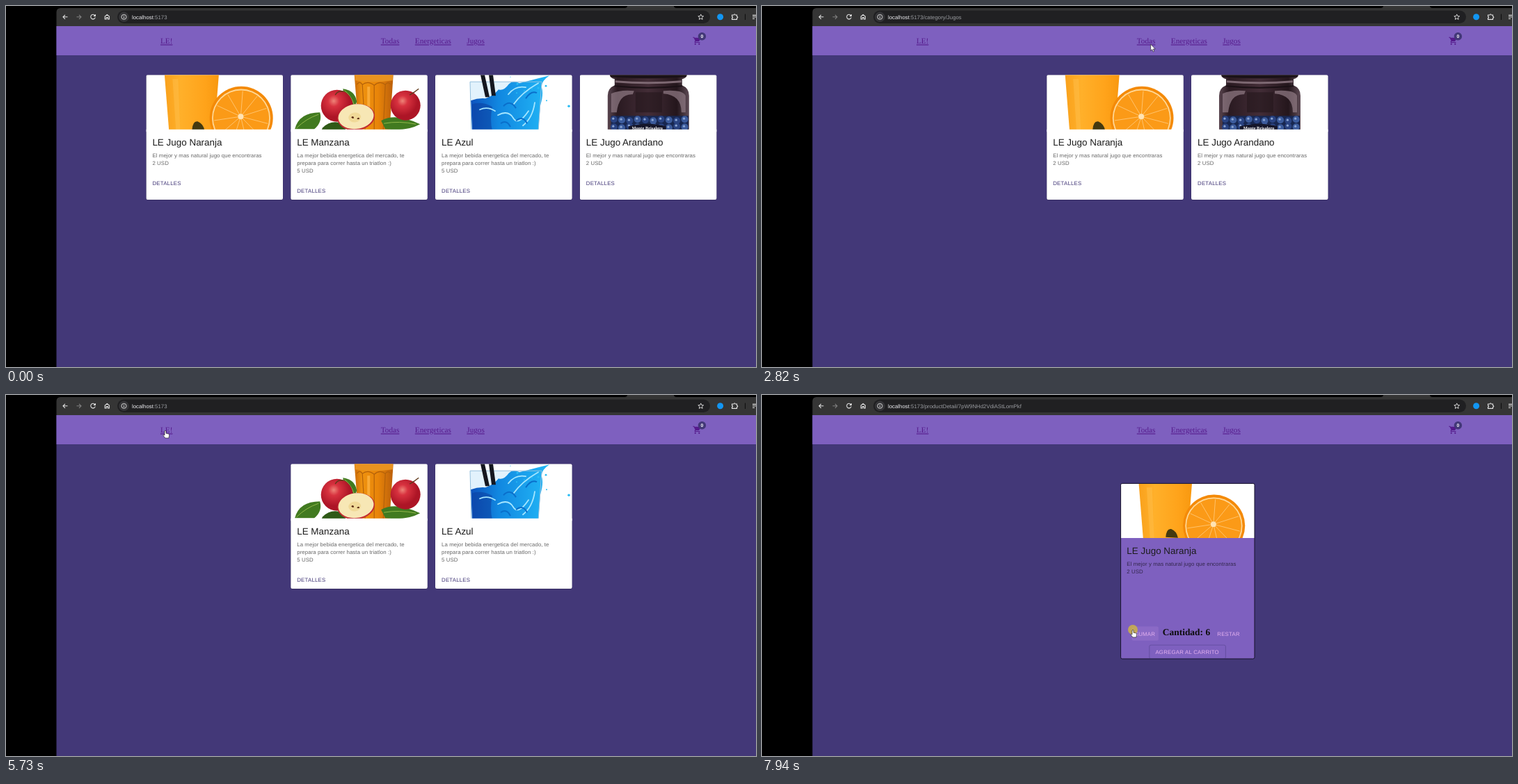
These frames come from a looping animation (1078 px wide and 520 px high, 8 s). An HTML page:

```html
<!DOCTYPE html>
<html lang="es">
<head>
<meta charset="utf-8">
<title>Tienda de jugos</title>
<style>
html, body { margin: 0; width: 100%; height: 100%; overflow: hidden; background: #000; }
svg { display: block; width: 1078px; height: 520px; }
text { font-family: "Liberation Sans", Arial, sans-serif; font-size: 7.84px; text-rendering: geometricPrecision; white-space: pre; }
.link { font-family: "Liberation Serif", "Times New Roman", serif; font-size: 11.2px; fill: #551a8b; text-decoration: underline; }
.title { font-size: 13.44px; fill: #1c1c1c; }
.body { fill: #000; fill-opacity: .6; letter-spacing: .01071em; }
.btn { fill: #433878; letter-spacing: .02857em; }
.pink { fill: #e4b1f0; }
.count { font-family: "Liberation Serif", "Times New Roman", serif; font-size: 13.44px; font-weight: bold; fill: #0c0c0c; }
.icon { fill: none; stroke: #e3e3e3; stroke-width: 1.1; }
.off { display: none; }
</style>
</head>
<body>
<svg viewBox="0 0 1078 520">
  <defs>
    <clipPath id="cardClip"><rect width="196.6" height="179.8" rx="2.2"/></clipPath>
    <clipPath id="itemClip"><rect x="515.6" y="127.4" width="192.4" height="252.6" rx="2.2"/></clipPath>
    <linearGradient id="juice"><stop stop-color="#f9a11c"/><stop offset=".3" stop-color="#ffb02a"/><stop offset=".75" stop-color="#ffa31a"/><stop offset="1" stop-color="#f8980f"/></linearGradient>
    <linearGradient id="cider"><stop stop-color="#c9690a"/><stop offset=".2" stop-color="#ee920f"/><stop offset=".6" stop-color="#e98509"/><stop offset="1" stop-color="#bb5f0b"/></linearGradient>
    <radialGradient id="apple" cx=".4" cy=".35"><stop stop-color="#ee8478"/><stop offset=".35" stop-color="#d8323f"/><stop offset="1" stop-color="#ad1526"/></radialGradient>
    <linearGradient id="blue"><stop stop-color="#0d52bd"/><stop offset=".35" stop-color="#1187e0"/><stop offset="1" stop-color="#22b8f7"/></linearGradient>
    <linearGradient id="jar"><stop stop-color="#5a4650"/><stop offset=".12" stop-color="#2a1a21"/><stop offset=".5" stop-color="#432d37"/><stop offset=".85" stop-color="#24161c"/><stop offset="1" stop-color="#5f4c56"/></linearGradient>

    <g id="naranja">
      <rect width="197" height="82" fill="#fff"/>
      <path d="M26.5 0H104.5L98 82H33Z" fill="url(#juice)"/>
      <path d="M38 6L43 82H49L46 6Z" fill="#ffc04c" opacity=".5"/>
      <path d="M66 79Q67 66 74 67Q82 70 84 80Z" fill="#44390f"/>
      <ellipse cx="136.8" cy="62" rx="45.5" ry="45.5" fill="#f48a08"/>
      <ellipse cx="136.6" cy="62.4" rx="42" ry="42" fill="#ffd795"/>
      <ellipse cx="136.6" cy="62.4" rx="40.2" ry="40.2" fill="#fb9a17"/>
      <g id="wedges" stroke="#ffc877" stroke-width=".9"></g>
      <circle cx="136" cy="60" r="4" fill="#ffe3b4"/>
    </g>

    <g id="manzana">
      <rect width="197" height="82" fill="#fff"/>
      <path d="M91.5 0H147.5L142 82H98Z" fill="url(#cider)"/>
      <path d="M92 0H147L146.5 8Q120 12 92.5 8Z" fill="#e9931f"/>
      <g stroke="#b3610a" stroke-width="1.2" fill="none"><path d="M103 14L107 80M120 15V80M136 14L133 80M95 14Q99 8 103 14Q111 8 120 15Q128 8 136 14Q140 9 144 14"/></g>
      <path d="M112 17V70" stroke="#ffb74a" stroke-width="4" opacity=".7"/>
      <g fill="#417a20"><path d="M6 78Q12 54 42 54Q46 68 34 78Z"/><path d="M75 20Q92 22 95 38Q94 44 90 45Q78 38 75 20Z"/><path d="M130 66Q150 54 186 71Q166 82 136 78Z"/></g>
      <path d="M8 77Q22 63 40 57M77 22Q87 30 91 43M134 70Q156 66 180 71" fill="none" stroke="#91b84a" stroke-width="1"/>
      <path d="M46 76Q58 64 74 70L80 80H44Z" fill="#2f5a17"/>
      <ellipse cx="66.5" cy="44.5" rx="23" ry="23" fill="url(#apple)"/>
      <path d="M64 29Q68 22 76 24" fill="none" stroke="#60391a" stroke-width="1.4"/>
      <ellipse cx="165" cy="44" rx="21.5" ry="21.5" fill="url(#apple)"/>
      <path d="M171 29Q178 25 184 20" fill="none" stroke="#60391a" stroke-width="1.4"/>
      <g transform="rotate(-8 94 61)"><ellipse cx="94" cy="61" rx="27" ry="19" fill="#c22c32"/><ellipse cx="94" cy="60" rx="25.6" ry="17.8" fill="#f7e7b5"/><ellipse cx="92" cy="61" rx="9" ry="7" fill="#f0d998"/></g>
      <path d="M87 61q3-3 4 1q-2 2-4-1M95 63q3-3 4 0q-2 2-4 0" fill="#5a2a12"/>
    </g>

    <g id="azul">
      <rect width="197" height="82" fill="#fff"/>
      <path d="M50 10H153L148 82H52Z" fill="#e2f2fc"/>
      <path d="M51 37Q62 33 72 34Q84 30 91 21Q98 24 106 13Q112 7 121 12Q136 8 164 1Q152 9 153 18Q156 28 151 44L148 80H53Z" fill="url(#blue)"/>
      <path d="M53 42Q68 38 82 46Q78 65 82 80H54Z" fill="#0b3e9f" opacity=".55"/>
      <path d="M50 10H153L148 82M50 10L52 82" fill="none" stroke="#94bfdd" stroke-width="1"/>
      <g fill="none" stroke="#a5e6ff" stroke-width="1.8" stroke-linecap="round"><path d="M105 28Q115 15 130 18M112 43Q125 25 148 12M90 58Q105 50 112 62T134 52M126 73Q140 62 143 40M64 50Q75 45 86 52"/></g>
      <g fill="none" stroke="#0a6fcb" stroke-width="2"><path d="M98 45Q108 35 116 48M116 66Q126 58 132 70M94 70Q103 64 108 75M130 34Q138 22 146 26"/></g>
      <path d="M65 0H71L78 32H72ZM77 0H83L87 30H81Z" fill="#15171f"/>
      <g id="drops" fill="#2bbdf4"></g>
    </g>

    <g id="arandano">
      <rect width="197" height="82" fill="#fff"/>
      <path d="M43 0H154Q154 4 147 6V15Q157 19 157 30V82H40V30Q40 19 50 15V6Q43 4 43 0Z" fill="url(#jar)"/>
      <path d="M43 0H154L152 3Q98 7 45 3Z" fill="#1a1217"/>
      <path d="M51 8Q98 12 146 8V11Q98 15 51 11Z" fill="#7d6872"/>
      <path d="M50 16Q98 21 147 16" fill="none" stroke="#1b1116" stroke-width="2"/>
      <g fill="#8c7781" opacity=".75"><path d="M45 27Q58 21 78 23L76 28Q56 27 53 54H45Z"/><path d="M120 23Q148 21 152 30V54H146Q146 29 120 27Z"/></g>
      <path d="M80 25H118V54H80Z" fill="#24161c" opacity=".6"/>
      <rect x="45" y="59" width="111" height="23" fill="#182750"/>
      <g id="berries"></g>
      <path d="M70 82V74Q98 67 124 74V82Z" fill="#15162a"/>
      <text x="97" y="79" text-anchor="middle" fill="#fff" style="font:bold 6.4px 'Liberation Serif',serif">Monte Brisalero</text>
    </g>
  </defs>

  <rect width="1078" height="520" fill="#000"/>
  <path d="M889 3Q893 3 893 0H960Q960 3 964 3Z" fill="#353535"/>
  <path d="M72.5 29V9Q72.5 3 78.5 3H1078V29Z" fill="#353535"/>
  <rect x="160" y="6.5" width="852" height="18.5" rx="9.2" fill="#202022"/>
  <circle cx="169.5" cy="15.8" r="7.2" fill="#353538"/>
  <g class="icon">
    <path d="M88.5 15.8H82M85 12.8L82 15.8L85 18.8"/>
    <path d="M101.5 15.8H108M105 12.8L108 15.8L105 18.8" stroke="#818181"/>
    <path d="M128 14A3.3 3.3 0 1 0 128.3 16.4M128.4 12V14.4H126"/>
    <path d="M142.2 15V19H144.2V16.6H146.4V19H148.4V15L145.3 12.4Z"/>
    <circle cx="169.5" cy="15.8" r="3.5" stroke-width=".9"/><path d="M169.5 15.2V17.8M169.5 13.6V14.4" stroke-width=".9"/>
    <path d="M998.7 11.9L999.8 14.5L1002.6 14.7L1000.5 16.6L1001.1 19.4L998.7 17.9L996.3 19.4L996.9 16.6L994.8 14.7L997.6 14.5Z" stroke-width=".9"/>
    <path d="M1043.5 13H1046Q1047.2 10.4 1048.4 13H1050.5V15Q1053 16.2 1050.5 17.4V19.4H1043.5V17.4Q1045.6 16.2 1043.5 15Z"/>
    <path d="M1062.5 11.5V20" stroke="#111"/>
    <path d="M1073 13.4H1078M1073 15.8H1078M1073 18.2H1076"/>
  </g>
  <circle cx="1026.6" cy="15.8" r="4.5" fill="#1296f3"/>
  <text x="181" y="18.6" fill="#ececf0">localhost<tspan id="path" fill="#9a9ca1"></tspan></text>

  <rect x="72.5" y="29" width="1006" height="491" fill="#433878"/>
  <rect x="72.5" y="29" width="1006" height="42" fill="#7e60bf"/>
  <text class="link" x="222" y="54.4">LE!</text>
  <text class="link" x="538.8" y="54.4">Todas</text>
  <text class="link" x="587.8" y="54.4">Energeticas</text>
  <text class="link" x="662.3" y="54.4">Jugos</text>
  <path transform="translate(986.8 43.6) scale(.56)" fill="#551a8b" d="M7 18c-1.1 0-1.99.9-1.99 2S5.9 22 7 22s2-.9 2-2-.9-2-2-2zM1 2v2h2l3.6 7.59-1.35 2.45c-.16.28-.25.61-.25.96 0 1.1.9 2 2 2h12v-2H7.42c-.14 0-.25-.11-.25-.25l.03-.12.9-1.63h7.45c.75 0 1.41-.41 1.75-1.03l3.58-6.49c.08-.14.12-.31.12-.48 0-.55-.45-1-1-1H5.21l-.94-2H1zm16 16c-1.1 0-1.99.9-1.99 2s.89 2 1.99 2 2-.9 2-2-.9-2-2-2z"/>
  <circle cx="1000.4" cy="43.8" r="5.7" fill="#433878"/>
  <text x="1000.4" y="46.3" text-anchor="middle" fill="#fff" font-weight="bold" style="font-size:6.72px">0</text>

  <g id="all"></g>
  <g id="energy"></g>
  <g id="juices"></g>
  <g id="detail">
    <rect x="515.6" y="127.4" width="192.4" height="252.6" rx="2.2" fill="#7e60bf"/>
    <g id="loading">
      <path d="M516.5 128.5H521.5L524 131V136H516.5Z" fill="#eceaf2"/>
      <path d="M517.5 135L520 131.5L523 135Z" fill="#6aa663"/>
      <text x="523.8" y="134.6" fill="#1a1228" style="font-size:7.55px">green iguana</text>
      <text class="body" x="524.3" y="228">undefined USD</text>
    </g>
    <g id="loaded">
      <g clip-path="url(#itemClip)">
        <use href="#naranja" transform="translate(515.6 127.4) scale(.98)"/>
        <rect x="515" y="206" width="194" height="175" fill="#7e60bf"/>
      </g>
      <text class="title" x="524.3" y="228.6">LE Jugo Naranja</text>
      <text class="body" x="524.3" y="246">El mejor y mas natural jugo que encontraras</text>
      <text class="body" x="524.3" y="257.2">2 USD</text>
    </g>
    <rect x="515.6" y="127.4" width="192.4" height="252.6" rx="2.2" fill="none" stroke="#17122a"/>
    <rect id="hover" x="531.5" y="333.4" width="38.4" height="20.4" rx="2.2" fill="#e4b1f0" opacity=".12"/>
    <text class="btn pink" x="535.8" y="346.6">SUMAR</text>
    <text class="count" id="count" x="575.8" y="345.6"></text>
    <text class="btn pink" x="654.3" y="346.6">RESTAR</text>
    <rect x="556.8" y="360.2" width="109.6" height="19.6" rx="2.2" fill="none" stroke="#433878" stroke-opacity=".5" stroke-width=".8"/>
    <text class="btn pink" x="565.4" y="372.9">AGREGAR AL CARRITO</text>
  </g>

  <g id="cursor" stroke="#111" stroke-width=".6" stroke-linejoin="round">
    <circle id="press" r="7" fill="#d2b83c" fill-opacity=".78" stroke="none"/>
    <path id="arrow" fill="#fff" d="M0 0V9.3L2.1 7.4L3.6 10.8L5.1 10.1L3.7 6.8H6.6Z"/>
    <path id="hand" fill="#fff" d="M-1 1Q0-.7 1 1V4.2L4.5 5Q5.9 5.4 5.7 7L4.9 11H-.2L-3.2 7Q-3 5.4-1 7Z"/>
  </g>
</svg>
<script>
const $ = id => document.getElementById(id);
const show = (id, on) => $(id).classList.toggle('off', !on);
const range = n => [...Array(n).keys()];

// Picture details built from small rules
$('wedges').innerHTML = range(11).map(i => {
  const a = i * Math.PI * 2 / 11 + .2;
  return `<path d="M136 60L${136.6 + 39 * Math.cos(a)} ${62.4 + 39 * Math.sin(a)}"/>`;
}).join('');
$('drops').innerHTML = range(9).map(i =>
  `<circle cx="${108 + i * 31 % 52}" cy="${3 + i * 17 % 24}" r="${.6 + i % 3 * .4}"/>`).join('') +
  '<circle cx="192" cy="45" r="1.8"/><circle cx="160" cy="37" r="1"/>';
$('berries').innerHTML = range(20).map(i => {
  const x = 49 + i % 10 * 11.3, y = 64 + (i > 9) * 10 + i % 3;
  return `<circle cx="${x}" cy="${y}" r="5" fill="${i % 2 ? '#3c5b9c' : '#2a4382'}"/><circle cx="${x - 1}" cy="${y - 1}" r="1.6" fill="#8aa4d2"/>`;
}).join('');

const juice = ['El mejor y mas natural jugo que encontraras', '2 USD'];
const energy = ['La mejor bebida energetica del mercado, te', 'prepara para correr hasta un triatlon :)', '5 USD'];
const products = [
  ['naranja', 'LE Jugo Naranja', juice],
  ['manzana', 'LE Manzana', energy],
  ['azul', 'LE Azul', energy],
  ['arandano', 'LE Jugo Arandano', juice],
];

function card([art, name, lines], slot) {
  const rows = lines.map((s, i) => `<text class="body" x="9" y="${118.8 + i * 11.2}">${s}</text>`).join('');
  return `<g transform="translate(${201.4 + slot * 207.8} 99.2)">
    <rect x="-.3" y=".3" width="197.2" height="180.2" rx="2.4" fill="#000" opacity=".22"/>
    <g clip-path="url(#cardClip)">
    <use href="#${art}"/><rect y="78.6" width="197" height="102" fill="#fff"/></g>
    <text class="title" x="9" y="101.4">${name}</text>${rows}
    <text class="btn" x="9" y="${136.7 + lines.length * 11.2}">DETALLES</text></g>`;
}
const fill = (id, picks, first) => {
  $(id).innerHTML = picks.map((p, i) => card(products[p], first + i)).join('');
};
fill('all', [0, 1, 2, 3], 0);
fill('energy', [1, 2], 1);
fill('juices', [0, 3], 1);

const STEP = 69.19, START = 255, LOOP = 8000;
const paths = [[-9, ''], [18, '/category/Energetica'], [30, '/category/Jugos'], [41, ''],
  [69, '/category/Energetica'], [78, ''], [90, '/productDetail/7pW9NHd2VdiAStLomPkf']];
const views = [[-9, 'all'], [21, 'energy'], [34, 'juices'], [45, 'all'], [73, 'energy'],
  [81, 'all'], [90, 'loading'], [93, 'loaded']];
const counts = [[-9, 1], [102, 2], [104, 3], [106, 4], [108, 5], [110, 6]];
const hands = [[14, 19], [26, 31], [38, 42], [54, 58], [66, 68], [76, 81], [87, 89], [100, 120]];
const presses = [17, 28, 40, 56, 67, 77, 88, 101, 103, 105, 107, 109, 111];
const moves = [
  [0, 1040, 497], [8, 546, 92], [11, 600, 68], [14, 590, 57], [19, 590, 57],
  [22, 644, 51], [26, 672, 57], [31, 672, 57], [38, 552, 55], [42, 552, 55],
  [47, 482, 51], [52, 249, 53], [54, 232, 51], [55, 232, 51], [56, 229, 53], [57, 229, 53],
  [63, 567, 67], [66, 625, 55], [68, 625, 55], [71, 519, 56], [76, 229, 51], [81, 229, 51],
  [87, 231, 254], [89, 231, 254], [92, 235, 258.4], [93, 235, 258.4], [100, 533, 338], [112, 533, 338],
];

const at = (table, k) => table.filter(r => r[0] <= k).pop()[1];

// Monotone cubic curve through the cursor points
const slope = (i, c) => (moves[i + 1][c] - moves[i][c]) / (moves[i + 1][0] - moves[i][0]);
function tangent(i, c) {
  if (i === 0 || i === moves.length - 1) return 0;
  const a = slope(i - 1, c), b = slope(i, c);
  return a * b <= 0 ? 0 : 2 * a * b / (a + b);
}
function place(k, c) {
  const i = Math.max(0, moves.findLastIndex(m => m[0] <= k));
  if (i === moves.length - 1) return moves[i][c];
  const p = moves[i], q = moves[i + 1], h = q[0] - p[0], u = (k - p[0]) / h, s = u * u * (3 - 2 * u);
  return p[c] * (1 - s) + q[c] * s +
    h * u * (1 - u) * ((1 - u) * tangent(i, c) - u * tangent(i + 1, c));
}

function draw(ms) {
  const k = Math.floor((ms % LOOP - START) / STEP);
  const view = at(views, k), item = view.startsWith('load');
  $('path').textContent = ':5173' + at(paths, k);
  for (const id of ['all', 'energy', 'juices', 'loading', 'loaded']) show(id, id === view);
  show('detail', item);
  show('hover', k >= 100);
  $('count').textContent = 'Cantidad: ' + at(counts, k);

  show('cursor', k >= 0);
  if (k < 0) return;
  const hand = hands.some(([a, b]) => k >= a && k < b);
  $('cursor').setAttribute('transform', `translate(${place(k, 1)} ${place(k, 2)})`);
  show('hand', hand);
  show('arrow', !hand);
  show('press', presses.includes(k));
}

const begin = performance.now();
function tick() {
  draw(performance.now() - begin);
  requestAnimationFrame(tick);
}
tick();
</script>
</body>
</html>
```
